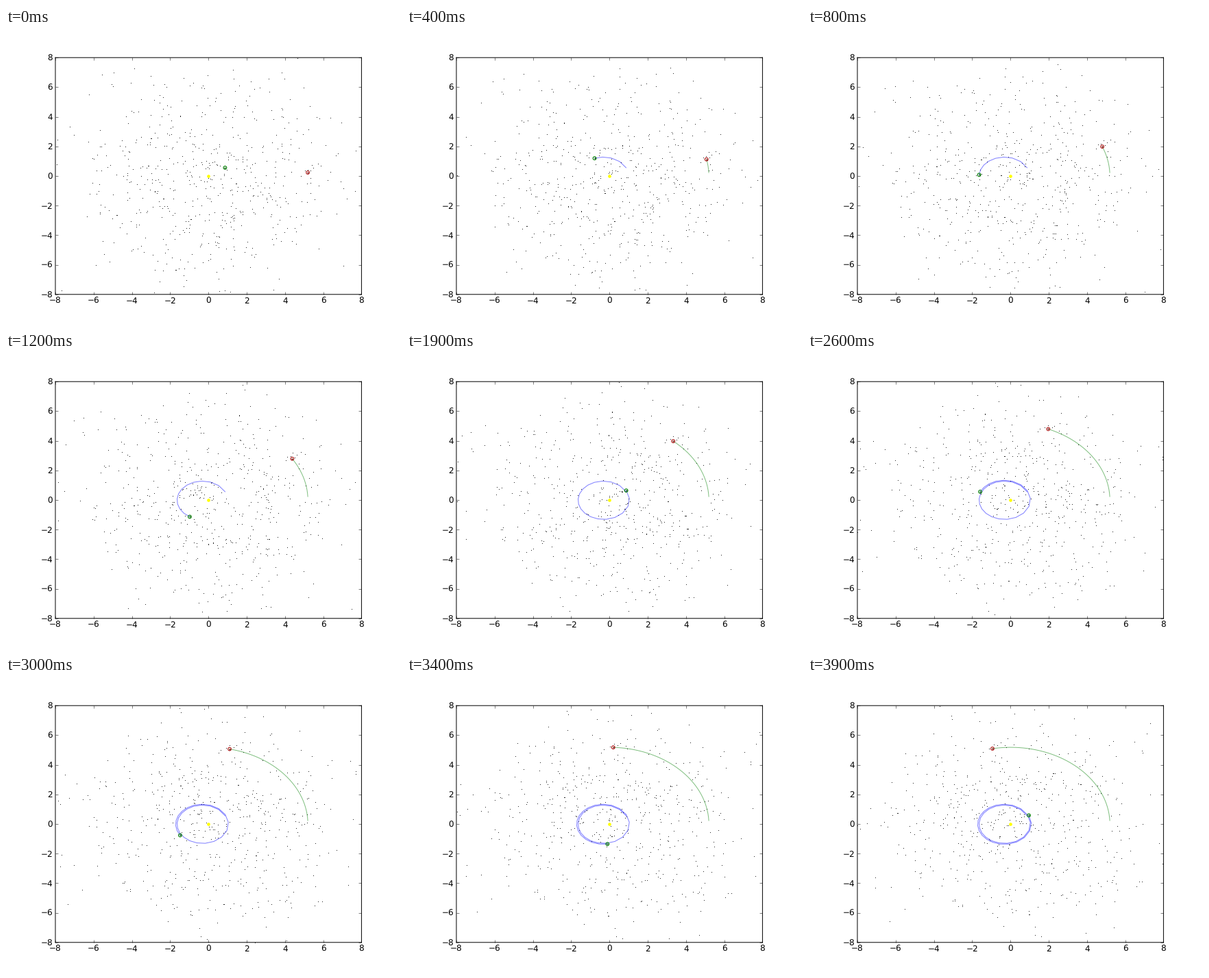
These frames come from a looping animation (576 px wide and 432 px high, 4000 ms). A matplotlib script:

```python
import numpy as np
import matplotlib.pyplot as plt
from matplotlib.animation import FuncAnimation

FRAMES = 40
ASTEROIDS = 600
GM = 0.27    # length cubed per frame squared
LIMIT = 8

plt.rcParams.update({
    "font.family": "DejaVu Sans", "font.size": 12, "text.hinting": "none",
    "path.snap": False, "axes.linewidth": 1.0,
    "xtick.top": True, "ytick.right": True,
})


def inner_orbit(k):
    """Kepler ellipse that slowly widens."""
    a0, e, growth, rate = 1.305, 0.232, 0.00235, 0.3437
    scale = 1 + growth * k
    mean = 0.355 + rate * 2 / growth * (1 - scale ** -0.5)
    ecc = mean.copy()
    for _ in range(20):
        ecc -= (ecc - e * np.sin(ecc) - mean) / (1 - e * np.cos(ecc))
    a = a0 * scale
    return a * (np.cos(ecc) - e), a * np.sqrt(1 - e * e) * np.sin(ecc)


def outer_orbit(k):
    angle = np.radians(2.55 + 2.485 * k + 0.00065 * k ** 2)
    r = 5.198 - 0.0005 * k
    return r * np.cos(angle), r * np.sin(angle)


def dots(size, color, **style):
    return ax.scatter([0], [0], s=size, color=color, **style)


def add_planet(ring, core):
    outline = ax.scatter([0], [0], s=22, facecolors="none", edgecolors=ring,
                         linewidths=1.1, zorder=3)
    return outline, dots(4, core, linewidths=0, zorder=3)


steps = np.arange(FRAMES, dtype=float)
paths = [inner_orbit(steps), outer_orbit(steps)]

# Circular orbits, thinned a little near the centre.
rng = np.random.default_rng(21)
radius = 5 * rng.weibull(2.2, ASTEROIDS)
phase = rng.uniform(0, 2 * np.pi, ASTEROIDS)
spin = np.sqrt(GM / radius ** 3)

fig = plt.figure(figsize=(8, 6), dpi=72, facecolor="white")
ax = fig.add_axes([0.125, 0.1, 0.775, 0.8])
ticks = range(-LIMIT, LIMIT + 1, 2)
ax.set(xlim=(-LIMIT, LIMIT), ylim=(-LIMIT, LIMIT), xticks=ticks, yticks=ticks)
ax.tick_params(direction="in", length=4, width=0.5, pad=4)

asteroids = dots(1.1, "black", linewidths=0)
trails = [ax.plot([], [], color=c, alpha=0.5, lw=1)[0] for c in ("blue", "green")]
sun = dots(22, "yellow", linewidths=0, zorder=3)
planets = [add_planet("green", "#004000"), add_planet("#b01818", "#600000")]


def update(i):
    angle = phase + spin * i
    asteroids.set_offsets(np.column_stack([radius * np.cos(angle),
                                           radius * np.sin(angle)]))
    for (x, y), trail, planet in zip(paths, trails, planets):
        trail.set_data(x[:i + 1], y[:i + 1])
        for part in planet:
            part.set_offsets([(x[i], y[i])])
    return [asteroids, *trails]


anim = FuncAnimation(fig, update, frames=FRAMES, interval=100, repeat=True,
                     repeat_delay=0, blit=False)
plt.show()
```
